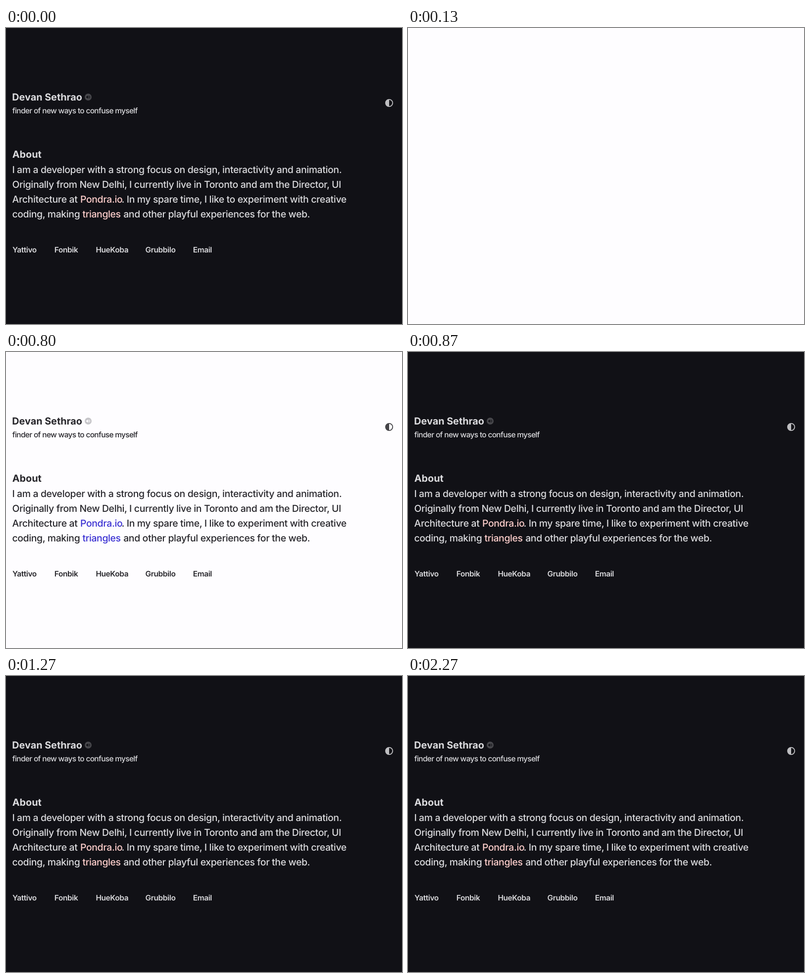
Animation, 800 px wide and 600 px high, one loop 2.34 s. Source, as an HTML page:

```html
<!DOCTYPE html>
<html lang="en">
<head>
<meta charset="utf-8">
<title>Theme flash</title>
<style>
  html, body { margin: 0; width: 100%; height: 100%; overflow: hidden; }

  svg {
    display: block;
    width: 100vw;
    height: 100vh;
    background: var(--bg);
    font-family: Inter, "Liberation Sans", sans-serif;
    text-rendering: geometricPrecision;
    animation: theme 2340ms step-end infinite;
  }

  /* dark page, blank reload, light page, dark page again */
  @keyframes theme {
    0%, 37.179%, 100% {
      --bg: #111116; --ink: #dbdbde; --link: #ffcfcc; --badge: #47474b; --show: 1;
    }
    5.555% {
      --bg: #fefdff; --ink: #27262b; --link: #3a30d2; --badge: #c6c5c9; --show: 0;
    }
    25.641% {
      --bg: #fefdff; --ink: #27262b; --link: #3a30d2; --badge: #c6c5c9; --show: 1;
    }
  }

  .page { opacity: var(--show); fill: var(--ink); }
  .head { font-size: 19.8px; font-weight: 700; }
  .sub { font-size: 15.4px; font-weight: 500; letter-spacing: -0.64px; }
  .body { font-size: 19.4px; font-weight: 500; letter-spacing: -0.36px; }
  .nav { font-size: 15.4px; font-weight: 600; letter-spacing: -0.35px; }
  .link { fill: var(--link); }
  .badge { fill: var(--badge); }
  .cut { fill: var(--bg); }
  .wave { fill: none; stroke: var(--bg); stroke-width: 0.9; stroke-linecap: round; }
  .toggle { opacity: 0.86; }
  .ring { fill: none; stroke: var(--ink); stroke-width: 1.8; }
</style>
</head>
<body>
<svg viewBox="0 0 800 600">
  <g class="page">
    <text class="head" x="12.3" y="147">Devan Sethrao</text>
    <g transform="translate(166 140)">
      <circle class="badge" r="7"/>
      <path class="cut" d="M-4-1.3h1.6L0-3.4v6.8L-2.4 1.3H-4z"/>
      <path class="wave" d="M1.4-1.4q1.1 1.4 0 2.8M2.7-2.7q2.2 2.7 0 5.4"/>
    </g>
    <text class="sub" x="12.8" y="173">finder of new ways to confuse myself</text>

    <g class="toggle" transform="translate(774 152)">
      <circle class="ring" r="7.1"/>
      <path d="M0-7.1a7.1 7.1 0 0 0 0 14.2z"/>
    </g>

    <text class="head" x="12.8" y="263">About</text>
    <g class="body">
      <text x="12.4" y="294">I am a developer with a strong focus on design, interactivity and animation.</text>
      <text x="12.4" y="324">Originally from New Delhi, I currently live in Toronto and am the Director, UI</text>
      <text y="354"><tspan x="12.6">Architecture at</tspan><tspan class="link" x="150">Pondra.io</tspan><tspan x="233.6">. In my spare time, I like to experiment with creative</tspan></text>
      <text y="384"><tspan x="12.4">coding, making</tspan><tspan class="link" x="154.4">triangles</tspan><tspan x="237.2">and other playful experiences for the web.</tspan></text>
    </g>

    <g class="nav">
      <text x="13" y="455">Yattivo</text>
      <text x="97.8" y="455">Fonbik</text>
      <text x="181.4" y="455">HueKoba</text>
      <text x="281.6" y="455">Grubbilo</text>
      <text x="377.7" y="455">Email</text>
    </g>
  </g>
</svg>
</body>
</html>
```
